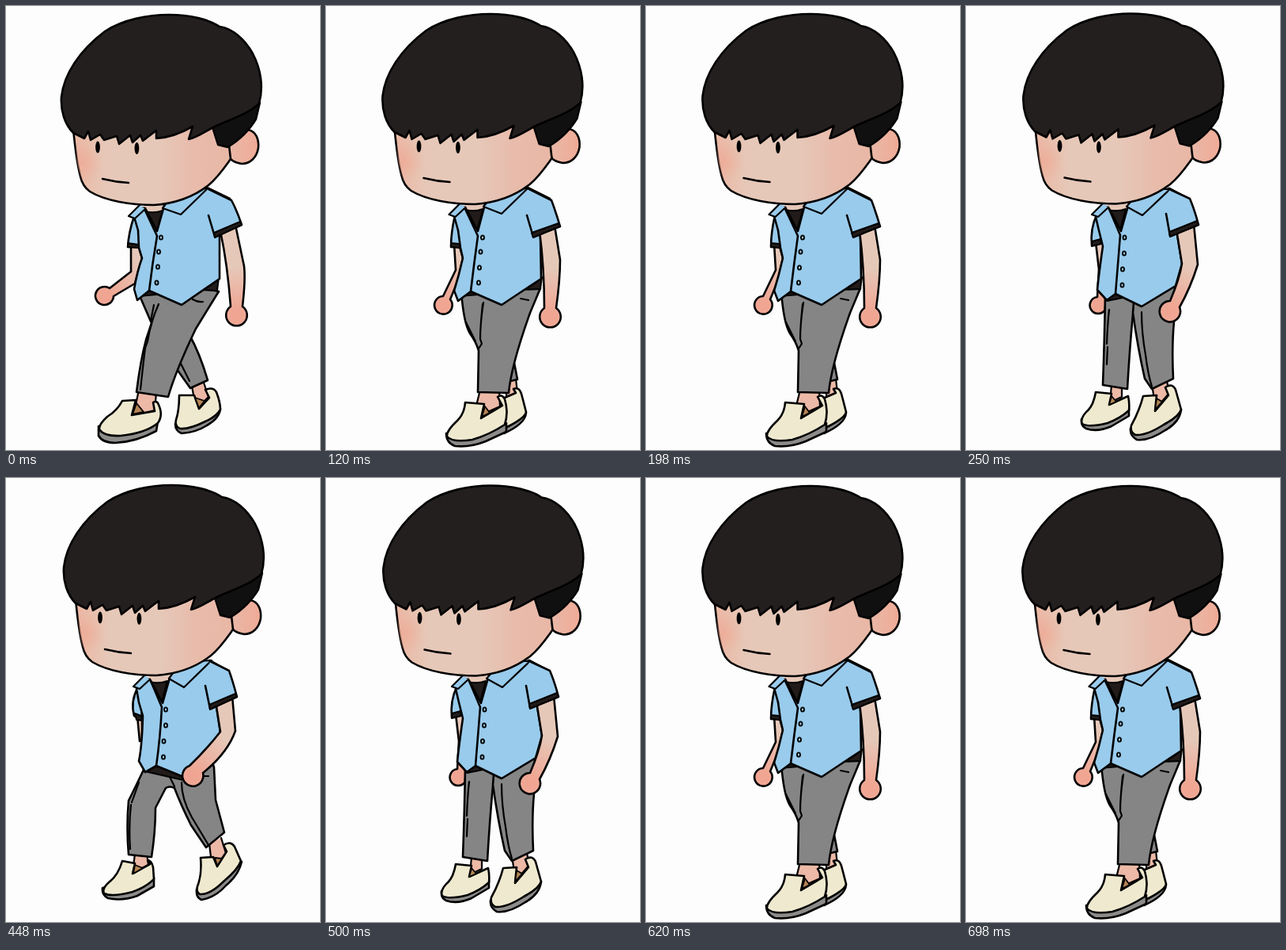
An HTML page that plays this animation: 397 px wide and 560 px high, repeating every 0.75 s.

```html
<!DOCTYPE html>
<html lang="en">
<head>
<meta charset="utf-8">
<title>Walking boy</title>
<style>
  html, body { margin: 0; width: 100%; height: 100%; overflow: hidden; background: #fdfdfd; }
  svg { display: block; width: 100%; height: 100%; }
  path, ellipse { stroke-linejoin: round; stroke-linecap: round; }
</style>
</head>
<body>
<svg id="stage" viewBox="0 0 397 560">
  <defs>
    <linearGradient id="face" gradientUnits="userSpaceOnUse" x1="86" y1="0" x2="290" y2="0">
      <stop offset="0" stop-color="#ebb7a3"/>
      <stop offset=".2" stop-color="#e6c8b8"/>
      <stop offset=".52" stop-color="#e6c8b9"/>
      <stop offset=".74" stop-color="#e8bbab"/>
      <stop offset="1" stop-color="#e9b7a6"/>
    </linearGradient>
    <radialGradient id="cheek" gradientUnits="userSpaceOnUse" cx="96" cy="197" r="26">
      <stop offset="0" stop-color="#efa590" stop-opacity=".6"/>
      <stop offset="1" stop-color="#efa590" stop-opacity="0"/>
    </radialGradient>
    <linearGradient id="ear" gradientUnits="userSpaceOnUse" x1="284" y1="0" x2="320" y2="0">
      <stop offset="0" stop-color="#e9b7a6"/>
      <stop offset="1" stop-color="#f0ab96"/>
    </linearGradient>
    <g id="head">
      <path d="M280 178C288 165 299 156 306 156C316 158 320 168 319 179C317 191 309 199 298 199C292 198 287 196 284 193Z"
        fill="url(#ear)" stroke="#000" stroke-width="2.6"/>
      <path id="skin" d="M85 155C87 176 90 200 94 215C96 224 99 229 106 234C126 246 158 251 187 251C215 249 238 240 256 226C268 216 276 204 284 193L279 150Z"
        fill="url(#face)" stroke="#000" stroke-width="2.6"/>
      <path d="M86 160C88 185 91 212 98 228L130 240L130 165Z" fill="url(#cheek)"/>
      <path d="M261 153L268 175L280 178C296 169 309 155 316 143L321 122Z" fill="#101011" stroke="#000" stroke-width="2.4"/>
      <path d="M85 160C74 149 69 132 70 115C73 86 93 56 125 32C148 17 180 11 206 11C232 11 257 17 270 26C286 28 302 42 312 60C322 79 326 102 320 123C304 138 282 143 262 153C252 158 243 165 231 168L236 152C222 160 208 166 190 167L190 157L173 170L170 163L160 172L157 163L143 174L140 164L124 169L119 162L107 169L104 158L99 167Z"
        fill="#231f1e" stroke="#000" stroke-width="2.6"/>
      <ellipse cx="116" cy="178" rx="2.9" ry="7.6"/>
      <ellipse cx="165.400" cy="179.500" rx="2.9" ry="7.6"/>
      <path d="M122 218Q138 222 155 223" fill="none" stroke="#000" stroke-width="2.6"/>
    </g>
  </defs>
</svg>
<script>
const NS = 'http://www.w3.org/2000/svg';
const stage = document.getElementById('stage');
const SHIRT = '#99cbec', PANTS = '#858585', SHOE = '#efe9cf', SOLE = '#8d8b89',
      DARK = '#211b1a', SKIN = '#e6c8b9', PINK = '#f0a592', ANKLE = '#ecb9a7';

function add(parent, tag, attrs) {
  const el = document.createElementNS(NS, tag);
  for (const key in attrs) el.setAttribute(key, attrs[key]);
  parent.appendChild(el);
  return el;
}
const shape = (g, d, fill = 'none', width = 2.6) =>
  add(g, 'path', { d, fill, stroke: '#000', 'stroke-width': width });

// Each pose lists its parts from back to front.
const poses = [
  {
    head: [0, 0], collar: [0, 0],
    backHand: [125, 366], backArm: 'M158 300L158 335L131 356A11.500 11.500 0 1 0 136 366L163 350L172 318L167 300',
    ankles: ['M168 484L164 503L166 515L188 510L190 488', 'M234 474L238 496L244 505L256 493L249 472'],
    shoes: [
      ['M117 530L117 542Q122 551 138 551Q164 550 190 536L192 524Z',
       'M147 498L164 497L159 516L188 511L186 500Q191 497 193 503Q199 516 192 526Q176 539 145 542Q124 543 118 534Q117 528 128 518Q141 510 147 498Z', 'M165 501L160 515L174 512Z'],
      ['M214 527Q214 536 222 539Q240 538 254 529Q270 520 271 508Z',
       'M219 491L238 491L244 508L257 494L252 484Q262 480 266 487Q271 500 271 509Q266 518 252 524Q232 534 220 533Q213 530 215 522Q219 510 219 491Z', 'M239 494L244 507L251 498Z']
    ],
    legs: ['M232 415Q245 438 255 472L233 482L211 451Z',
           'M167 361L184 400L177 421Q170 447 165 487L205 493Q215 459 240 407L269 360L222 350Z'],
    seams: 'M193 376Q183 398 179 423L176 431Q173 455 170 484M187 377L183 397M221 451L232 473M236 370Q243 374 249 373',
    hem: 'M244 358L267 359L269 343ZM168 366L182 357L190 364Z',
    sleeveL: 'M162 265Q155 286 154 304L168 304L170 280Z', cuffL: 'M154 299L168 301L168 305L154 304Z',
    body: 'M170 254L162 266L167 283L168 305L172 318Q166 334 162 357L166 371L181 359L222 377L270 344L270 290L283 243L254 229L200 252L191 284L176 255Z',
    placket: 'M176 258L191 290Q185 325 181 359',
    collarR: 'M204 247L198 255L221 263L255 230L239 231',
    buttons: [[196, 292], [193, 310], [192, 329], [190.500, 349]],
    hand: [292, 391], arm: 'M271 284Q280 325 284 379A13.300 13.300 0 1 0 299 379Q303 345 301 328L290 276',
    sleeve: 'M256 264L264 291L298 276Q292 258 285 245L254 230', cuff: 'M263 286L296 272L298 276L264 292Z'
  },
  {
    head: [1.5, -1], collar: [.5, -2],
    backHand: [148, 377], backArm: 'M162 300L164 333L148 366A11.300 11.300 0 1 0 157 370L167 346L173 318L168 300',
    ankles: ['M229 471L228 494L242 488L240 470', 'M195 484L190 504L200 514L220 505L219 484'],
    shoes: [
      ['M216 534L225 539Q252 527 253 513Z', 'M226 494L240 488L237 483Q244 480 247 489L253 512Q252 520 225 533L218 510Z', ''],
      ['M152 539Q152 551 163 555Q182 557 202 549L228 537L228 526Z',
       'M176 500L200 502L196 520L223 504L217 493Q223 489 226 496Q231 513 226 528Q206 541 185 547Q160 551 153 543Q152 536 166 523Q175 514 176 500Z', 'M201 505L197 518L207 513Z']
    ],
    legs: ['M236 440L242 471L225 475Z',
           'M171 360Q174 400 182 413Q190 424 193 435L192 487L231 488Q234 454 258 387L271 356L222 350Z'],
    seams: 'M199 374Q195 400 195 420L197 426L193 432M198 376L196 397M177 399L189 423M246 369L256 371',
    hem: 'M246 358L271 357L273 342ZM169 366L184 358L192 364Z',
    sleeveL: 'M163 264Q158 286 158 304L169 304L171 280Z', cuffL: 'M158 299L169 300L169 305L158 304Z',
    body: 'M169 252L162 265L167 283L170 305L173 318Q168 340 162 359L167 372L183 360L222 377L272 344L271 290L283 243L255 229L201 250L192 284L176 254Z',
    placket: 'M176 256L192 290Q187 326 183 360',
    collarR: 'M205 246L199 253L222 262L255 230L240 231',
    buttons: [[198, 292], [195.500, 310], [194, 330], [193, 349]],
    hand: [283, 392], arm: 'M270 284Q276 330 276 381A13.300 13.300 0 1 0 291 381Q296 345 296 320L289 277',
    sleeve: 'M254 264L262 291L296 278Q290 258 285 245L255 230', cuff: 'M260 286L294 274L296 278L262 292Z'
  },
  {
    head: [2.5, -1.5], collar: [4, -2],
    backHand: [168, 377], backArm: 'M164 298L168 332L166 367A10.500 10.500 0 1 0 176 383L178 340L173 298',
    ankles: ['M184 478L182 500L197 493L197 478', 'M235 476L238 497L245 502L257 488L253 468'],
    shoes: [
      ['M146 521Q145 530 152 533Q166 538 184 530L206 517L206 508Z',
       'M164 487L184 489L181 503L205 492Q207 501 206 510Q195 520 179 526Q155 532 147 527Q144 521 152 512Q161 505 164 487Z', 'M184 492L181 503L190 499Z'],
      ['M208 533Q207 542 216 547Q231 549 252 535Q270 525 272 509Z',
       'M224 492L241 491L239 511L256 491L252 481Q261 475 265 484L272 509Q269 518 250 528Q228 542 214 541Q207 537 209 529Q219 511 224 492Z', 'M241 495L239 509L248 499Z']
    ],
    legs: ['M176 364Q175 425 173 478L204 483Q207 430 211 389L222 360Z',
           'M212 374L211 387Q217 430 226 470L235 483L262 470Q260 430 263 398L264 350L222 355Z'],
    seams: 'M181 383Q179 400 178 426M179 430L178 452M222 386Q222 412 227 440Q230 464 235 480',
    hem: 'M174 367L188 362L198 368L178 372Z',
    sleeveL: 'M165 264Q157 281 159 302L171 299L171 280Z', cuffL: 'M159 297L170 294L171 300L159 303Z',
    body: 'M173 252L164 266L168 283L173 303Q168 338 166 358L178 371L189 363L222 379L265 353L273 325L267 288L281 243L257 230L205 252L196 284L180 254Z',
    placket: 'M181 256L195 289Q192 328 189 363',
    collarR: 'M209 246L203 253L223 264L258 231L242 231',
    buttons: [[200.500, 292], [200, 312], [198, 332], [197.500, 352]],
    hand: [258, 385], arm: 'M266 282L273 325Q270 344 258 372A13.200 13.200 0 1 0 270 380Q284 355 293 326L288 275',
    sleeve: 'M253 262L258 290L294 276Q289 257 283 243L257 231', cuff: 'M257 285L292 271L294 276L258 291Z'
  },
  {
    head: [3, -2], collar: [6, -2],
    backHand: [170, 368], backArm: 'M166 300L169 332L172 330L172 300',
    ankles: ['M163 474L160 498L180 488L178 473', 'M257 461L259 478L266 489L278 473L272 454'],
    shoes: [
      ['M122 517Q121 526 129 530Q146 534 166 527L187 515L187 504Z',
       'M147 483L163 486L160 499L182 487L179 482Q184 482 186 491L187 506Q177 516 160 522Q134 529 124 524Q121 518 130 510Q142 501 147 483Z', 'M163 488L161 499L173 492Z'],
      ['M241 519Q240 529 247 532Q265 529 278 514Q294 501 298 484Z',
       'M246 479L262 478L267 490L279 471L275 463Q284 457 289 465L297 483Q293 494 276 508Q258 526 245 525Q240 522 242 515Q248 500 246 479Z', 'M264 479L267 489L273 480Z']
    ],
    legs: ['M174 368Q165 387 155 407Q152 440 155 475L184 478Q189 446 189 416L202 391Q207 388 213 391Q221 412 234 438L253 466L276 447L265 406L263 365L258 350L222 355Z'],
    seams: 'M168 384L159 409M158 412Q155 438 157 468M222 384Q222 405 235 428L256 463M207 377L213 389M248 376L256 376',
    hem: 'M175 369L190 362L222 374L224 381L180 371Z',
    sleeveL: 'M167 264Q157 281 162 300L172 305L171 280Z', cuffL: 'M163 297L171 300L172 306L165 305Z',
    body: 'M175 252L165 266L168 283L173 300Q172 338 168 357L176 371L190 363L222 376L250 359L271 321L266 288L280 243L258 230L207 252L198 284L182 254Z',
    placket: 'M183 256L197 289Q195 328 190 363',
    collarR: 'M211 246L206 253L225 264L260 230L244 231',
    buttons: [[202, 292], [202, 312], [199.500, 332], [199, 352]],
    hand: [236, 376], arm: 'M265 282L271 320Q253 343 232 363A13.200 13.200 0 1 0 249 372Q280 347 290 319L286 275',
    sleeve: 'M252 262L258 291L292 276Q287 257 282 243L258 231', cuff: 'M257 286L290 272L292 276L258 292Z'
  }
];

function handTint(id, [cx, cy]) {
  const grad = add(stage, 'radialGradient', { id, gradientUnits: 'userSpaceOnUse', cx, cy, r: 62 });
  add(grad, 'stop', { offset: 0.1, 'stop-color': PINK });
  add(grad, 'stop', { offset: 1, 'stop-color': SKIN });
  return `url(#${id})`;
}

function drawPose(pose, i) {
  const g = add(stage, 'g', { visibility: 'hidden' });
  const move = ([x, y]) => `translate(${x} ${y})`;

  shape(g, pose.backArm, handTint('back' + i, pose.backHand));
  pose.shoes.forEach(([sole, upper, inside], n) => {
    shape(g, pose.ankles[n], ANKLE, 2.2);
    shape(g, sole, SOLE);
    shape(g, upper, SHOE);
    shape(g, inside, '#b58454', 1.8);
  });
  pose.legs.forEach(d => shape(g, d, PANTS));
  shape(g, pose.seams, 'none', 2.2);
  shape(g, pose.hem, DARK, 2);

  const neck = add(g, 'g', { transform: move(pose.collar) });
  add(neck, 'path', { d: 'M172 245L210 240L203 257L178 262Z', fill: SKIN });
  shape(neck, 'M176 259Q187 262 198 258L190 288Z', DARK, 2);
  shape(g, pose.sleeveL, SHIRT);
  shape(g, pose.cuffL, DARK, 2);
  shape(g, pose.body, SHIRT);
  shape(g, pose.placket);
  const left = add(g, 'g', { transform: move(pose.collar) });
  shape(left, 'M169 251L155 265L163 268L176 256', SHIRT, 2.2);
  shape(g, pose.collarR, SHIRT, 2.2);
  pose.buttons.forEach(([cx, cy]) =>
    add(g, 'ellipse', { cx, cy, rx: 2, ry: 2.6, fill: SHIRT, stroke: '#000', 'stroke-width': 1.9 }));

  shape(g, pose.arm, handTint('front' + i, pose.hand));
  shape(g, pose.sleeve, SHIRT);
  shape(g, pose.cuff, DARK, 2);
  add(g, 'use', { href: '#head', transform: move(pose.head) });
  return g;
}

const groups = poses.map(drawPose);
const LOOP = 750;
const starts = [0, 120, 250, 370, 500, 620];
const order = [0, 1, 2, 3, 2, 1];

function render(time) {
  const t = time % LOOP;
  const step = starts.filter(s => s <= t).length - 1;
  groups.forEach((g, i) => g.setAttribute('visibility', i === order[step] ? 'visible' : 'hidden'));
}

const begin = performance.now();
function tick() {
  render(performance.now() - begin);
  requestAnimationFrame(tick);
}
render(0);
requestAnimationFrame(tick);
</script>
</body>
</html>
```
